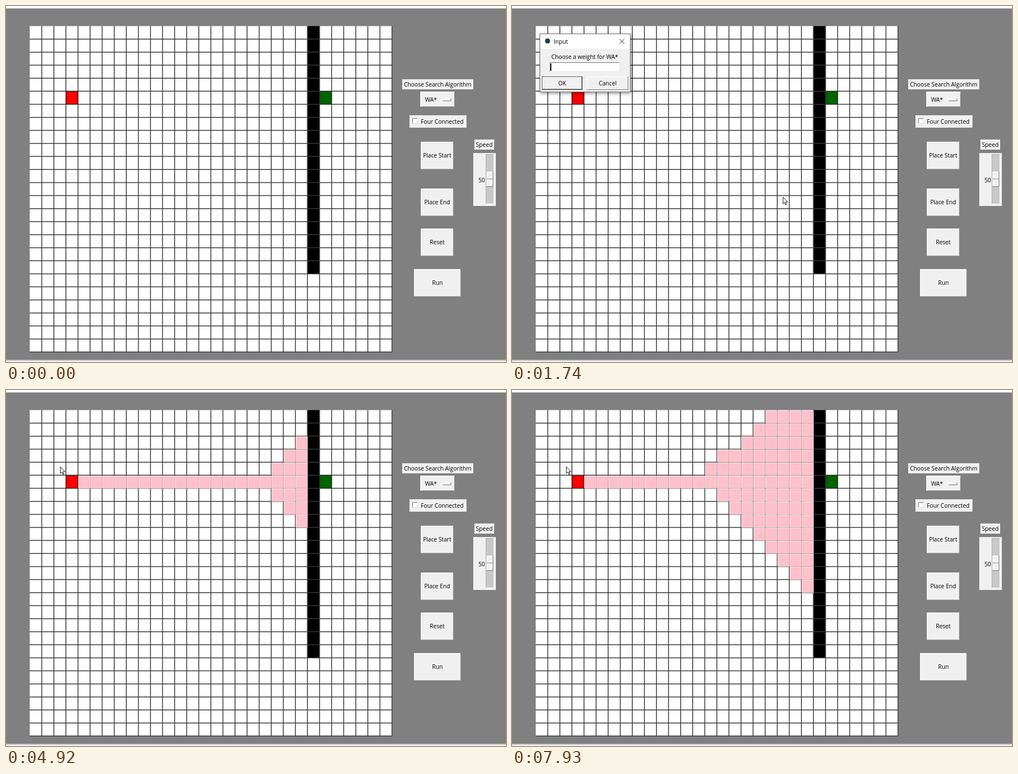
Write an HTML page that moves like this. It is 886 px wide and 632 px high and loops after 8 s.

```html
<!DOCTYPE html>
<html lang="en">
<head>
<meta charset="utf-8">
<title>Grid search</title>
<style>
html, body { margin: 0; width: 100%; height: 100%; overflow: hidden; background: #808080; }
svg { display: block; width: 886px; height: 632px; }
text { font: 10.2px "Open Sans", "Noto Sans", sans-serif; fill: #000; }
.mid { text-anchor: middle; }
#dialog { filter: drop-shadow(1px 2px 3px rgba(0, 0, 0, .45)); }
</style>
</head>
<body>
<svg id="stage" viewBox="0 0 886 632"></svg>
<script>
const LOOP = 8000, COLS = 30, ROWS = 25, LEFT = 42, TOP = 35.6, CW = 21.4, CH = 23.15;
const START = [3, 5], GOAL = [24, 5], WALL = 23, WALL_ROWS = 19;
const FACE = '#f0f0f0';

const rect = (x, y, w, h, fill, more = '') =>
  `<rect x="${x}" y="${y}" width="${w}" height="${h}" fill="${fill}" ${more}/>`;
const path = (d, stroke, width = 1, fill = 'none') =>
  `<path d="${d}" stroke="${stroke}" stroke-width="${width}" fill="${fill}"/>`;
const text = (x, y, s, mid = true) => `<text x="${x}" y="${y}" class="${mid ? 'mid' : ''}">${s}</text>`;
const colX = c => LEFT + c * CW;
const rowY = r => TOP + r * CH;

// Light edge at the top left, dark edge at the bottom right
function bevel(x, y, w, h, light = '#fff', dark = '#8c8c8c', fill = FACE) {
  const r = x + w - .5, b = y + h - .5;
  return rect(x, y, w, h, fill) +
    path(`M${x + .5} ${b}V${y + .5}H${r}`, light) +
    path(`M${x} ${b}H${r}V${y}`, dark);
}
const button = (x, y, w, h, label) =>
  bevel(x, y, w, h, '#fff', '#a8a8a8') + text(x + w / 2, y + h / 2 + 3.7, label);

function grid() {
  let lines = '';
  for (let c = 1; c <= COLS; c++) lines += `M${colX(c)} ${TOP}V${rowY(ROWS)}`;
  for (let r = 1; r <= ROWS; r++) lines += `M${LEFT} ${rowY(r)}H${colX(COLS)}`;
  let out = rect(LEFT, TOP, COLS * CW, ROWS * CH, '#fff') + path(lines, '#3c3c3c', 1.5);
  for (let r = 0; r < WALL_ROWS; r++)
    out += rect(colX(WALL), rowY(r), CW, CH, '#000', 'stroke="#4a4a4a" stroke-width=".9"');
  return out;
}
const marker = ([c, r], fill) =>
  rect(colX(c) + .3, rowY(r) + .3, CW - .6, CH - .6, fill, 'stroke="#222" stroke-width="1"');

// Greedy order: straight to the wall, then ring by ring of Manhattan distance to the goal
function visitOrder() {
  const cells = [];
  for (let c = START[0] + 1; c < WALL; c++) cells.push([c, GOAL[1]]);
  for (let dist = 3; dist <= 11; dist++) {
    const ring = [];
    for (let d = 1; d <= dist - 2; d++) {
      const c = GOAL[0] - dist + d;
      if (d <= GOAL[1]) ring.push([c, GOAL[1] - d, d]);
      ring.push([c, GOAL[1] + d, d + 1.5]);
    }
    cells.push(...ring.sort((a, b) => a[2] - b[2]));
  }
  return cells;
}
function visited([c, r]) {
  const x = colX(c), y = rowY(r);
  return '<g class="visited">' + rect(x + .7, y + .7, CW, CH, '#a3989a') +
    rect(x + .7, y + .7, CW - 1, CH - 1, '#fff') +
    rect(x + 1.5, y + 1.5, CW - 1.8, CH - 1.8, '#ffc0cb') + '</g>';
}

const panel =
  rect(702, 130, 126, 18, FACE) + text(765, 142.7, 'Choose Search Algorithm') +
  bevel(734, 152, 62, 28, '#fff', '#777') + path('M736 178.5H794.5V154', '#aaa') +
  text(753, 170, 'WA*') + bevel(774, 164, 15, 5, '#fff', '#777') +
  rect(715, 194, 101, 22, FACE) + bevel(720, 199, 10, 10, '#777', '#ddd', '#fff') +
  text(735, 208.5, 'Four Connected', false) +
  button(735, 241, 58, 49, 'Place Start') +
  button(735, 324, 58, 49, 'Place End') +
  button(735, 395, 58, 49, 'Reset') +
  button(723, 467, 83, 49, 'Run') +
  rect(830, 237, 35, 18, FACE) + text(847.5, 249.5, 'Speed') +
  rect(828, 261, 40, 94, FACE) + bevel(850, 263, 15, 89, '#aaa', '#fff', '#c8c8c8') +
  bevel(851.5, 294, 12, 27, '#fff', '#777') + path('M852 307H863', '#888') +
  text(843, 312.7, '50');

const dialog = '<g id="dialog">' +
  rect(49, 49, 161, 104, FACE) + rect(49, 49, 161, 27, '#fff') +
  rect(49.5, 49.5, 160, 103, 'none', 'stroke="#777"') +
  '<circle cx="63" cy="62" r="4.5" fill="#27384f"/>' +
  text(74, 66.5, 'Input', false) + path('M190.5 58.5l8.5 8.5m0-8.5l-8.5 8.5', '#222') +
  text(129, 94, 'Choose a weight for WA*') +
  bevel(67, 100, 124, 17, '#777', '#e8e8e8', '#fff') +
  '<text id="entry" x="69" y="112"></text>' + rect(68, 102, 1.6, 13, '#000', 'id="caret"') +
  rect(53.5, 125.5, 71, 23, FACE, 'stroke="#555"') + bevel(54, 126, 70, 22, '#fff', '#777') +
  path('M54.5 147V126.5H123', '#777', 1).replace('<path', '<path id="pressed"') +
  text(89, 140.7, 'OK') +
  bevel(133, 125, 73, 24, '#fff', '#777') + text(169.5, 140.7, 'Cancel') + '</g>';

const order = visitOrder();
document.getElementById('stage').innerHTML =
  rect(0, 0, 886, 632, '#808080') + rect(0, 0, 886, 4.3, '#fff') +
  rect(0, 628, 886, 4, '#c4c4c4') + rect(0, 630, 886, 2, '#f4f4f4') +
  grid() + order.map(visited).join('') +
  marker(START, '#f00') + marker(GOAL, '#006400') + panel + dialog +
  path('M.3 .3V12.2L3 9.7 4.9 14 6.7 13.2 4.8 9H8.5Z', '#000', .9, '#fff')
    .replace('<path', '<path id="cursor"');

const el = id => document.getElementById(id);
const cells = [...document.querySelectorAll('.visited')];
const show = (node, on) => { node.style.display = on ? '' : 'none'; };
const clamp = v => Math.max(0, Math.min(1, v));
const smooth = u => u * u * (3 - 2 * u);

// Value at time t on a track of [time, ...values]
function at(track, t, ease = u => u) {
  let i = 0;
  while (i < track.length - 2 && t >= track[i + 1][0]) i++;
  const [a, b] = [track[i], track[i + 1]];
  const u = ease(clamp((t - a[0]) / (b[0] - a[0])));
  return a.slice(1).map((v, k) => v + (b[k + 1] - v) * u);
}

const mouse = [[100, 815, 634], [650, 768, 499], [1110, 768, 499], [1490, 480, 339],
  [2860, 480, 339], [3000, 141, 147], [3130, 141, 147], [3260, 143, 153], [3600, 96, 136]];
const progress = [[4150, 0], [4890, 30], [4920, 31], [5670, 46], [6480, 67], [6879, 67],
  [6880, 73], [7249, 73], [7250, 81], [7679, 81], [7680, 82], [7930, 87]];

function draw(t) {
  const [x, y] = at(mouse, t, smooth);
  el('cursor').setAttribute('transform', `translate(${x} ${y})`);
  show(el('cursor'), t >= 100);

  const fadeIn = 1 - (1 - clamp((t - 870) / 230)) ** 2;
  const opacity = fadeIn * (1 - clamp((t - 4130) / 150));
  show(el('dialog'), opacity > 0);
  el('dialog').style.opacity = opacity;
  show(el('pressed'), t >= 4040);

  const typed = '20'.slice(0, (t >= 2180) + (t >= 2260));
  el('entry').textContent = typed;
  el('caret').setAttribute('x', 68 + typed.length * 5.8);
  show(el('caret'), (t + 60) % 900 < 600);

  const count = Math.floor(at(progress, t)[0] + 1e-6);
  cells.forEach((cell, i) => show(cell, i < count));
}

const begin = performance.now();
function tick() {
  draw((performance.now() - begin) % LOOP);
  requestAnimationFrame(tick);
}
tick();
</script>
</body>
</html>
```
